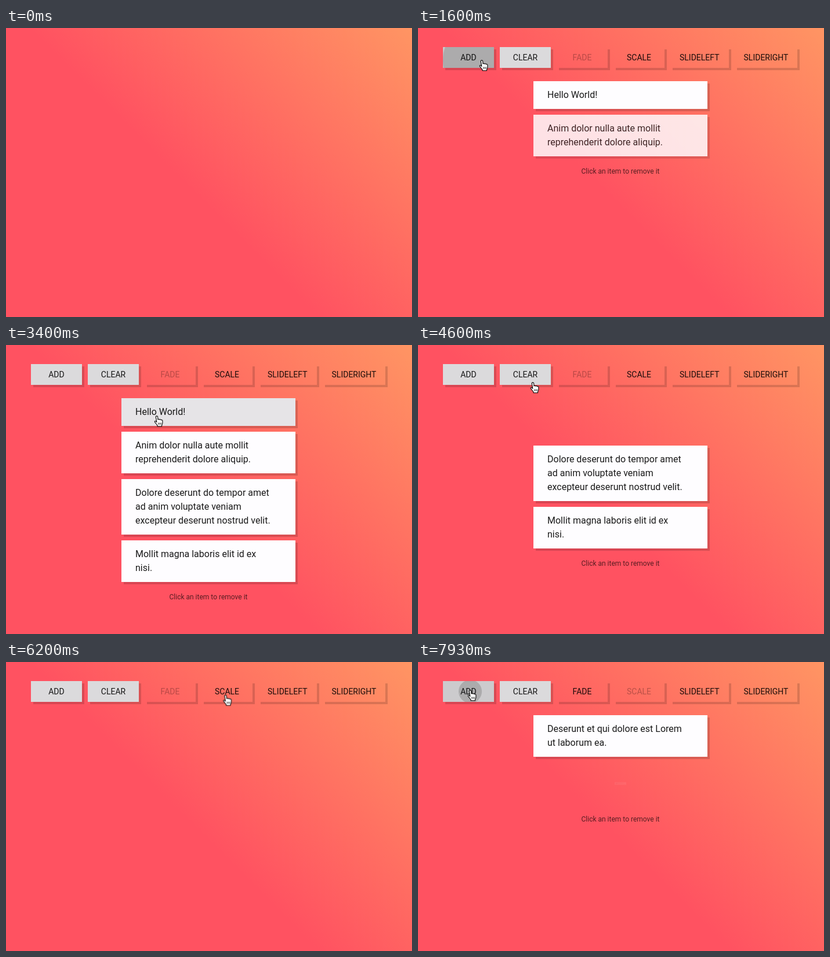
Write an HTML page without scripts that moves like this. It is 700 px wide and 500 px high and loops after 8 s.

```html
<!DOCTYPE html>
<html lang="en">
<head>
<meta charset="utf-8">
<title>List transitions</title>
<style>
/* One loop is 8 s, so 1% is 80 ms. */
html, body { margin: 0; width: 100%; height: 100%; overflow: hidden; }
body { font: 16px/24px Roboto, sans-serif; color: rgba(0, 0, 0, .9); }
.stage {
  position: relative; width: 700px; height: 500px; overflow: hidden;
  background: linear-gradient(45deg, #ff5261 45%, #ff9563);
}
.stage * { animation: 8s ease infinite both; }
.ui, .stack { position: absolute; inset: 0; }
.ui { animation-name: show; }
.stack { animation-name: stack; animation-timing-function: step-end; }

.bar { position: absolute; left: 43px; top: 33px; display: flex; gap: 10px; }
.btn {
  position: relative; box-sizing: border-box; min-width: 88px; height: 36px;
  padding: 0 16px; overflow: hidden; text-align: center;
  font-size: 14px; line-height: 36px;
  box-shadow: 4px 4px rgba(0, 0, 0, .15);
}
.solid { background: #dbdadc; }
.add { animation-name: hover-add; }
.clear { animation-name: hover-clear; }
.fade, .scale { animation-timing-function: step-end; }
.fade { animation-name: enable; }
.scale { animation-name: disable; }

.btn i {
  position: absolute; left: calc(var(--x) - 70px); top: calc(var(--y) - 70px);
  width: 140px; height: 140px; border-radius: 50%; background: #000; opacity: 0;
  animation: ripple 8s cubic-bezier(.25, .6, .5, 1) var(--t) infinite both;
}
.btn .late { animation: ripple-late 8s linear infinite; }

.item {
  position: absolute; left: 199px; top: var(--top); width: 300px;
  box-sizing: border-box; padding: 12px 24px; white-space: nowrap;
  background: #fefdff; box-shadow: 4px 4px rgba(0, 0, 0, .15);
}
.one { animation-name: one, hover-one; }
.two { animation-name: two, hover-two; }
.three { animation-name: three; }
.four { animation-name: four; }
.five { animation-name: five; }
.six { animation-name: six; animation-timing-function: cubic-bezier(.5, .1, .8, .6); }

.help {
  position: absolute; left: 199px; width: 300px; text-align: center;
  font-size: 12px; line-height: 18px; color: rgba(0, 0, 0, .66);
  animation-name: help; animation-timing-function: step-end;
}

.cursor { position: absolute; left: 0; top: 0; overflow: visible; animation-name: move; animation-timing-function: ease-in-out; }
.kind { --hand: 0; animation-name: kind; animation-timing-function: step-end; }
.hand { opacity: var(--hand); }
.arrow { opacity: calc(1 - var(--hand)); }

@keyframes show { 0%, .4% { opacity: 0; } 6.25%, 100% { opacity: 1; } }
@keyframes stack {
  0% { transform: none; }
  50.4% { transform: translateY(-58px); }
  58.13%, 100% { transform: translateY(-140px); }
}
@keyframes one { 0%, 44.1% { opacity: 1; } 50.4%, 100% { opacity: 0; } }
@keyframes two { 0%, 16.63% { opacity: 0; } 22.88%, 51.63% { opacity: 1; } 57.88%, 100% { opacity: 0; } }
@keyframes three { 0%, 25.88% { opacity: 0; } 32.13%, 60% { opacity: 1; } 66.25%, 100% { opacity: 0; } }
@keyframes four { 0%, 34.13% { opacity: 0; } 40.38%, 60% { opacity: 1; } 66.25%, 100% { opacity: 0; } }
@keyframes five { 0%, 88.63% { opacity: 0; transform: scale(0); } 94.88%, 100% { opacity: 1; transform: none; } }
@keyframes six { 0%, 98.56% { opacity: 0; transform: scale(0); } 100% { opacity: .36; transform: scale(.36); } }

@keyframes hover-one { 0%, 38.9% { background: #fefdff; } 41.4%, 100% { background: #e6e4e7; } }
@keyframes hover-two { 0%, 50.4% { background: #fefdff; } 52.9%, 100% { background: #e6e4e7; } }
@keyframes hover-add {
  0%, 13.1%, 38.2%, 86.9% { background: #dbdadc; }
  15.6%, 36.3%, 89.1%, 100% { background: #cccbcd; }
}
@keyframes hover-clear {
  0%, 57.5%, 69.1%, 100% { background: #dbdadc; }
  60%, 66.6% { background: #cccbcd; }
}
@keyframes enable { 0% { color: rgba(0, 0, 0, .28); } 80%, 100% { color: rgba(0, 0, 0, .9); } }
@keyframes disable { 0% { color: rgba(0, 0, 0, .9); } 80%, 100% { color: rgba(0, 0, 0, .28); } }

@keyframes ripple {
  0% { transform: scale(0); opacity: .16; }
  4.5% { transform: none; opacity: .16; }
  7%, 100% { transform: none; opacity: 0; }
}
@keyframes ripple-late {
  0%, 98.35% { transform: scale(0); opacity: .16; }
  100% { transform: scale(.6); opacity: .16; }
}

@keyframes help {
  0% { top: 157px; opacity: 1; }
  16.63% { top: 239px; }
  25.88% { top: 345px; }
  34.13% { top: 427px; }
  50.4% { top: 369px; }
  58.13% { top: 287px; opacity: 1; }
  66.25% { top: 181px; opacity: 0; }
  88.4% { top: 181px; opacity: 1; }
  98.35%, 100% { top: 263px; opacity: 1; }
}

@keyframes move {
  0%, 9.95% { transform: translate(2px, 130px); opacity: 0; }
  10% { transform: translate(2px, 130px); opacity: 1; animation-timing-function: linear; }
  10.9% { transform: translate(46px, 104px); animation-timing-function: ease-out; }
  14.1%, 35.6% { transform: translate(110px, 56px); }
  41.9%, 52.5% { transform: translate(260px, 123px); }
  57.4% { transform: translate(198px, 65px); }
  57.6% { transform: translate(198px, 65px); }
  59%, 66.6% { transform: translate(190px, 58px); }
  70% { transform: translate(278px, 169px); animation-timing-function: ease-out; }
  71.25%, 73.1% { transform: translate(290px, 178px); }
  78.1%, 81% { transform: translate(381px, 54px); }
  86.6%, 100% { transform: translate(90px, 49px); opacity: 1; }
}
@keyframes kind {
  0%, 36.5%, 54%, 67.5%, 80% { --hand: 0; }
  12.9%, 38.9%, 57.3%, 77.5%, 82.5%, 100% { --hand: 1; }
}
</style>
</head>
<body>
<div class="stage">
  <div class="ui">
    <div class="bar">
      <div class="btn solid add">ADD
        <i style="--x:67px;--y:23px;--t:1330ms"></i>
        <i style="--x:67px;--y:23px;--t:2070ms"></i>
        <i style="--x:67px;--y:23px;--t:2730ms"></i>
        <i style="--x:47px;--y:18px;--t:7070ms"></i>
        <i class="late" style="--x:47px;--y:18px"></i>
      </div>
      <div class="btn solid clear">CLEAR<i style="--x:49px;--y:25px;--t:4800ms"></i></div>
      <div class="btn fade">FADE</div>
      <div class="btn scale">SCALE<i style="--x:44px;--y:21px;--t:6400ms"></i></div>
      <div class="btn">SLIDELEFT</div>
      <div class="btn">SLIDERIGHT</div>
    </div>

    <div class="item one" style="--top:92px">Hello World!</div>
    <div class="stack">
      <div class="item two" style="--top:150px">Anim dolor nulla aute mollit<br>reprehenderit dolore aliquip.</div>
      <div class="item three" style="--top:232px">Dolore deserunt do tempor amet<br>ad anim voluptate veniam<br>excepteur deserunt nostrud velit.</div>
      <div class="item four" style="--top:338px">Mollit magna laboris elit id ex<br>nisi.</div>
    </div>
    <div class="item five" style="--top:92px">Deserunt et qui dolore est Lorem<br>ut laborum ea.</div>
    <div class="item six" style="--top:174px">Ullamco sint aute minim duis<br>quis ea.</div>
    <div class="help">Click an item to remove it</div>
  </div>

  <svg class="cursor" width="1" height="1">
    <g class="kind" stroke-linejoin="round">
      <path class="arrow" fill="#000" stroke="#fff" stroke-width="1.2"
        d="M.5 .5V15l3.3-3.1 2.3 5.4 2.4-1-2.3-5.2h4.5z"/>
      <g class="hand" stroke="#000" stroke-width="1.1">
        <path fill="#fff" d="M-1.7 1.3C-1.7-.6 1.5-.6 1.6 1.3L2 6c.3-1.2 2.6-1 2.8.3.6-1 2.5-.7 2.7.6.8-.8 2.4-.3 2.4 1.2v3.4c0 2-1 3-1.4 5v1.2H1.1v-1.2c-.8-2-3.2-4-4.6-6.2-.9-1.6.8-2.5 2-1.2l1.3 1.3z"/>
        <path fill="none" stroke-width=".9" d="M2.8 11.5v3.2M5 11.5v3.2M7.2 11.5v3.2"/>
      </g>
    </g>
  </svg>
</div>
</body>
</html>
```
